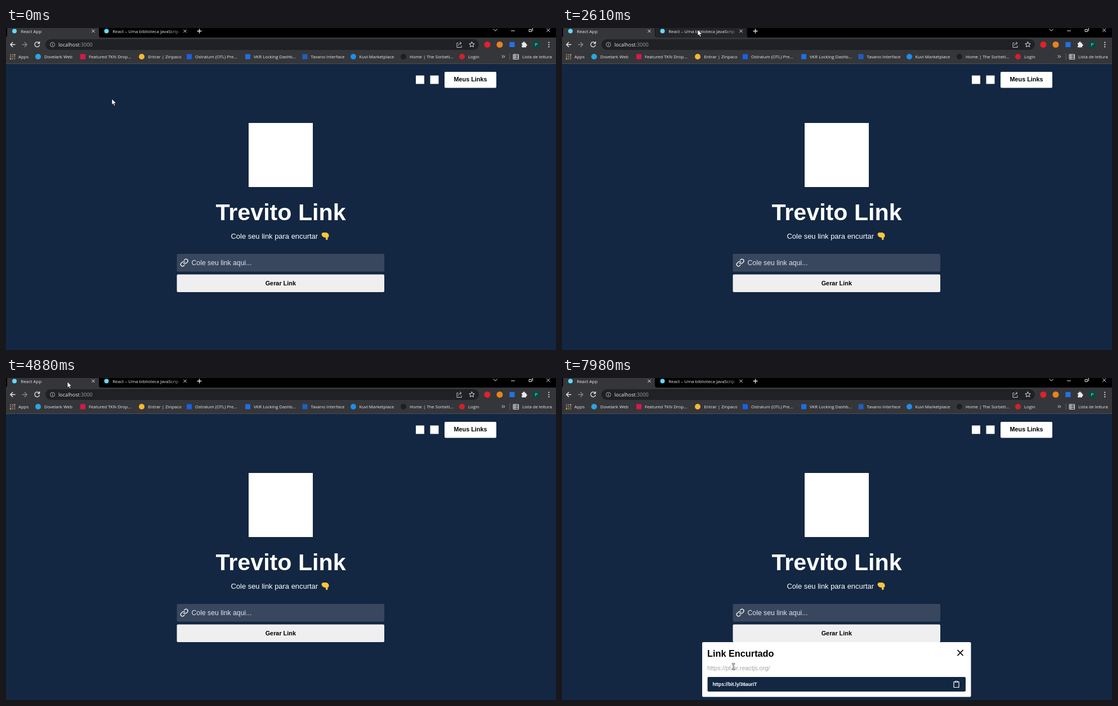
Recreate the animation shown at these times as an HTML page. Size 977 by 573 pixels, loop 8000 ms.

```html
<!DOCTYPE html>
<html lang="pt-BR">
<head>
<meta charset="utf-8">
<title>Trevito Link</title>
<style>
html, body { margin: 0; width: 100%; height: 100%; overflow: hidden; background: #132742; }
svg { display: block; }
text { white-space: pre; }
.ui { font-family: "Open Sans", "Noto Sans", sans-serif; }
.app { font-family: "Liberation Sans", Arial, sans-serif; }
.line { fill: none; stroke-linecap: round; stroke-linejoin: round; }
</style>
</head>
<body>
<svg id="stage" width="977" height="573" viewBox="0 0 977 573"></svg>
<script>
const text = (x, y, size, str, fill = '#fff', extra = '') =>
  `<text x="${x}" y="${y}" font-size="${size}" fill="${fill}" ${extra}>${str}</text>`;
const rect = (x, y, w, h, fill, r = 0, extra = '') =>
  `<rect x="${x}" y="${y}" width="${w}" height="${h}" rx="${r}" fill="${fill}" ${extra}/>`;
const dot = (x, y, r, fill, extra = '') => `<circle cx="${x}" cy="${y}" r="${r}" fill="${fill}" ${extra}/>`;
const line = (d, stroke = '#e8eaed', width = 1, extra = '') =>
  `<path class="line" d="${d}" stroke="${stroke}" stroke-width="${width}" ${extra}/>`;
const group = (id, body, extra = '') => `<g id="${id}" ${extra}>${body}</g>`;
const lines = (x, y, step, size, rows, fill, extra) =>
  rows.map((row, i) => text(x, y + i * step, size, row, fill, extra)).join('');
const cross = (x, y, r, color, width) =>
  line(`M${x - r} ${y - r}l${2 * r} ${2 * r}m0 ${-2 * r}l${-2 * r} ${2 * r}`, color, width);

const NAVY = '#132742', CYAN = '#61dafb', BAR = '#35363a', LIGHT = '#e8eaed';
const BOLD = 'font-weight="700"', THIN = 'font-weight="300"', MID = 'text-anchor="middle"';

// Browser window
const bookmarks = [
  [22, 'Apps'], [68, 'Dovelark Web', 57, '#2ca5e0'], [147, 'Featured TKN Drop...', 136.5, '#dd1745', 1],
  [252.5, 'Entrar | Zinpaco', 241, '#f3ba2f'], [336, 'Ostralum (OTL) Pre...', 325.5, '#1d5fe6', 1],
  [440, 'VKR Locking Dashb...', 429.5, '#1f6fe0', 1], [541.5, 'Tavano Interface', 531, '#1f5fc0', 1],
  [627.5, 'Kuvi Marketplace', 617, '#1d8cf0'], [717, 'Home | The Sorbeti...', 706, '#1d1e20'],
  [821, 'Login', 810, '#d3202e'],
];
const bookmarkBar = bookmarks.map(([x, label, icon, color, square]) =>
  text(x, 53.8, 7.75, label, LIGHT) + (!icon ? '' :
    square ? rect(icon - 4.5, 46.5, 9, 9, color) : dot(icon, 51, 5, color))).join('');
const appGrid = [...'012345678'].map(i =>
  rect(7 + i % 3 * 3.6, 46.6 + (i / 3 | 0) * 3.6, 2.2, 2.2, ['#e8564a', '#4a8af4', '#f4bd2e', '#3aa757'][i % 4])).join('');
const tabShape = (id, fill) => `<path id="${id}" fill="${fill}" d="M-3 17.5q5 0 5-5V0H165V12.5q0 5 5 5z"/>`;

const windowFrame =
  rect(0, 0, 977, 18, '#000') + tabShape('hoverTab', '#242528') +
  rect(0, 17, 977, 47, BAR) + rect(0, 63, 977, 1, '#4b4d51') + tabShape('tab', BAR) +
  dot(15, 5.5, 4, CYAN) + text(26.3, 8.6, 7.9, 'React App', LIGHT) + cross(155, 5.5, 2.4, LIGHT) +
  dot(178.5, 5.5, 4, CYAN) + text(189.3, 8.6, 7.8, 'React – Uma biblioteca JavaScrip', 'url(#fade)') +
  cross(318, 5.5, 2.4, LIGHT) + line('M340 5.5h7m-3.5-3.5v7', LIGHT, 1.3) +
  line('M866 2l3.3 3.3L872.3 2M897.5 5h6M929.5 2.5h4v4h-4zM931-.5h4.5V5') + cross(963.3, 4, 2.8, LIGHT) +
  line('M16 29.5H8m3.8-4l-4 4 4 4', LIGHT, 1.3) + line('M29 29.5h8m-3.8-4l4 4-4 4', '#85878b', 1.3) +
  line('M59 27a4.3 4.3 0 1 0 .4 3.6M59.6 24.5v3h-3', LIGHT, 1.3) +
  rect(70, 20, 770, 19, '#202124', 9.5, 'id="pill"') +
  group('localUrl', dot(82.5, 29.5, 4, 'none', 'stroke="#aab0b6"') + line('M82.5 29v2.5m0-4v.1', '#aab0b6') +
    text(93, 32.7, 9, 'localhost<tspan fill="#9aa0a6">:3000</tspan>', LIGHT)) +
  group('reactUrl', rect(79.5, 28, 6, 5, '#aab0b6', .5) + line('M80.8 28v-1.6a1.7 1.7 0 0 1 3.4 0v1.6', '#aab0b6') +
    rect(93, 23, 68, 13, '#62789b', 0, 'id="selection"') + text(93.3, 32.7, 8.9, 'pt-br.reactjs.org', LIGHT)) +
  line('M803 26.5h-2v8h8v-3M803.5 31q.5-4 5-4m-2-2.2l2.5 2.2-2.5 2.2', '#c4c7cb') +
  line('M827.5 24.7l1.4 3 3.3.4-2.4 2.2.6 3.3-2.9-1.6-2.9 1.6.6-3.3-2.4-2.2 3.3-.4z', LIGHT) +
  dot(855, 29.5, 5.5, '#e3202b') + dot(877, 29.5, 5.5, '#e8821e') + rect(894.5, 25, 9, 9, '#1f74e8') +
  rect(916, 26.5, 8, 8, LIGHT, 1) + dot(920, 26, 1.7, LIGHT) + dot(924, 30.5, 1.7, LIGHT) + dot(916, 30.5, 1.3, BAR) +
  dot(942, 29.5, 7, '#064b40') + text(942, 32.3, 8, 'P', '#dfe7e5', MID) +
  [25.6, 29.5, 33.4].map(y => dot(964.3, y, 1.1, LIGHT)).join('') +
  appGrid + bookmarkBar + line('M881 48.8l2 2-2 2m3-4l2 2-2 2') + rect(894.5, 45, 1, 12, '#5f6165') +
  line('M901.5 47h9v8.5h-9zM901.5 49.8h9m-9 2.8h9M904 47v8.5') + text(917, 53.8, 7.75, 'Lista de leitura', LIGHT);

// Link shortener page
const chain = 'M10 13a5 5 0 0 0 7.54.54l3-3a5 5 0 0 0-7.07-7.07l-1.72 1.71M14 11a5 5 0 0 0-7.54-.54l-3 3a5 5 0 0 0 7.07 7.07l1.71-1.71';
const home = rect(0, 64, 977, 509, NAVY) +
  group('header', rect(728, 84.5, 15, 15, '#fff') + rect(753.5, 84.5, 15, 15, '#fff') +
    rect(779, 78, 92, 28.5, '#fff', 2) + text(825, 95.4, 10.85, 'Meus Links', '#000', `${BOLD} ${MID}`)) +
  group('content',
    rect(431, 169, 114, 114, '#fff') +
    text(488, 342, 41.2, 'Trevito Link', '#fff', `${BOLD} ${MID}`) +
    text(399.5, 375, 12.95, 'Cole seu link para encurtar') +
    '<path fill="#fbc63c" d="M563 364h6q4 1 4.500 4.500V371q-.5 1.500-2 1.500V376q-1.500 2.500-3.500 0v-3q-5 0-7-4-1.500-3 2-5z"/>' +
    group('form',
      rect(303.5, 402, 368.5, 31.5, '#38475e', 2) + line(chain, '#fff', 2, 'transform="translate(309 410) scale(.636)"') +
      group('placeholder', text(329.5, 421.7, 12.25, 'Cole seu link aqui...', '#dfe3e9')) +
      group('pasted', text(329.5, 421.7, 12.25, 'https://pt-br.reactjs.org/')) +
      group('button', rect(303.5, 438.5, 368.5, 31.5, '#efefef', 2) +
        text(487.8, 458, 10.85, 'Gerar Link', '#000', `${BOLD} ${MID}`))) +
    group('modal', rect(249, 470, 477.5, 97.5, '#fff', 2) + text(258, 496, 16.3, 'Link Encurtado', '#000', BOLD) +
      cross(707.5, 489, 4.6, '#000', 1.6) + text(258, 519.7, 10.9, 'https://pt-br.reactjs.org/', '#a4a4a4') +
      rect(258.5, 532, 458.5, 26, NAVY, 2) + text(267.5, 548, 8.3, 'https://bit.ly/36auriT', '#fff', BOLD) +
      line('M698.5 540.5h-2.5v10h9v-10h-2.5M698.5 539.5h4v2h-4z', '#fff', 1.2)));

// Documentation page
const column = (x, title, y, rows) => lines(x, 481, 21, 15, title, '#6d6d6d', THIN) + lines(x, y, 19.5, 11, rows, '#1a1a1a');
const docs = rect(0, 64, 967, 329, '#282c34') + dot(725, 385, 214, '#30333c') +
  rect(0, 64, 967, 41, '#20232a') + rect(0, 393, 967, 180, '#fff') +
  dot(73.5, 85, 6.5, CYAN) + text(88, 89.7, 12.7, 'React', CYAN, BOLD) +
  [[225, 'Documentação'], [331, 'Tutorial'], [394.5, 'Blog'], [445, 'Comunidade']]
    .map(([x, label]) => text(x, 89.3, 11.3, label, '#fff', THIN)).join('') +
  dot(553.5, 83.5, 3.5, 'none', 'stroke="#fff" stroke-width="1.4"') + line('M556.2 86.2l3.3 3.5', '#fff', 1.6) +
  text(566, 89.3, 11.3, 'Buscar docs', '#7b7e84', THIN) + text(717, 88.2, 9, 'v17.0.2') +
  text(760.5, 86.5, 9, '文', '#fff', 'font-family="Noto Sans CJK SC, sans-serif"') + text(768, 91, 10.5, 'A') +
  text(781.7, 88.2, 9.1, 'Languages') + text(847.7, 88.2, 9, 'Codrux') +
  line('M886 82h-2.5v5.5h5.5V85M887 81.5h2.7v2.7m-.2-2.5l-3 3', '#70747a', .8) +
  text(482.5, 210, 37.8, 'React', CYAN, `${BOLD} ${MID}`) +
  text(482, 250, 19.4, 'Uma biblioteca JavaScript para criar interfaces de usuário', '#fff', `${THIN} ${MID}`) +
  rect(363, 299, 124, 36, CYAN) + text(425, 322.3, 12.8, 'Comece a Usar', '#000', MID) +
  text(502, 322.3, 12.8, 'Faça o Tutorial', CYAN) + line('M597.5 314.5l3.5 3.5-3.5 3.5', CYAN, .9) +
  column(66, ['Declarativo'], 513.3, ['React faz com que a criação de UIs interativas seja', 'uma tarefa fácil. Crie views simples para cada',
    'estado na sua aplicação, e o React irá atualizar e', 'renderizar de forma eficiente apenas os']) +
  column(352, ['Baseado em componentes'], 513.3, ['Crie componentes encapsulados que gerenciam',
    'seu próprio estado e então, combine-os para criar', 'UIs complexas.']) +
  column(639, ['Aprenda uma vez, use em qualquer', 'lugar'], 534.5, ['Não fazemos suposições sobre as outras',
    'tecnologias da sua stack, assim você pode', 'desenvolver novos recursos com React sem']);

const scrollbar = rect(967, 64, 10, 509, '#f1f1f1') + rect(968, 75, 8, 98, '#c1c1c1', 0, 'id="thumb"') +
  '<path fill="#666" d="M969.5 71l2.5-3 2.5 3zM969.5 567l2.5 3 2.5-3z"/>';

const stage = document.getElementById('stage');
stage.innerHTML = `<defs><linearGradient id="fade" gradientUnits="userSpaceOnUse" x1="290" x2="309">
  <stop stop-color="${LIGHT}"/><stop offset="1" stop-color="#6a6b6d"/></linearGradient></defs>` +
  group('home', home, 'class="app"') + group('docs', docs, 'class="ui"') + group('scrollbar', scrollbar) +
  group('frame', windowFrame, 'class="ui"') +
  '<path id="arrow" fill="#fff" stroke="#111" stroke-width=".8" d="M0 0V11l2.5-2.4 1.7 4 1.9-.8-1.7-3.9H7.8z"/>' +
  group('beam', line('M-2 -5h4M-2 5h4M0 -5V5', '#111', 1.8) + line('M-2 -5h4M-2 5h4M0 -5V5', '#e4e4e4', .9));

const el = Object.fromEntries([...stage.querySelectorAll('[id]')].map(node => [node.id, node]));
const show = (node, on) => { node.style.display = on ? '' : 'none'; };
const move = (node, x, y, more = '') => node.setAttribute('transform', `translate(${x} ${y})${more}`);

// Eased value between [time, ...values] keys
function track(keys, t) {
  const next = keys.findIndex(key => key[0] > t);
  if (next < 1) return (next ? keys.at(-1) : keys[0]).slice(1);
  const [a, b] = [keys[next - 1], keys[next]];
  const p = (t - a[0]) / (b[0] - a[0]), e = p * p * (3 - 2 * p);
  return a.slice(1).map((v, i) => v + (b[i + 1] - v) * e);
}

const pointer = [[270, 188, 126], [1010, 505, 400], [1510, 516, 389.5], [1860, 512, 375], [2540, 241, 3], [2900, 241, 3],
  [3250, 230, 24], [3500, 226, 24], [3640, 252, 22], [3840, 252, 22], [4390, 109, 6.5], [4940, 109, 6.5], [5080, 614, 383],
  [5300, 602, 416], [6060, 590, 422], [6400, 560, 456], [6900, 545, 476], [7270, 538, 497], [7340, 538, 497], [7800, 304.5, 513.5]];
const formDrop = [[650, 0], [1080, 18], [1510, 9], [1930, 4], [2050, 0]];
const buttonScale = [[6200, 1], [6600, 1.05], [6900, 1.05], [7270, 1.004], [7400, 1]];
const TAB_STEP = 163.5;

function render(now) {
  const t = now % 8000;
  const onDocs = t >= 2740 && t < 4600, focused = onDocs && t >= 3300;
  const pasted = t >= 5500 && t < 6990, modalOpen = t >= 7060;
  const rise = 64 * (1 - Math.min(1, (t - 7060) / 880)) ** 2;
  const overflow = modalOpen ? rise - 6 : 0;
  const scrolls = overflow > 0;
  const [x, y] = track(pointer, t);

  show(el.docs, onDocs);
  show(el.home, !onDocs);
  show(el.reactUrl, onDocs);
  show(el.localUrl, !onDocs);
  show(el.selection, focused);
  move(el.tab, onDocs ? TAB_STEP : 0, 0);
  move(el.hoverTab, onDocs ? 0 : TAB_STEP, 0);
  show(el.hoverTab, y < 17 && x < 328 && x > 165 !== onDocs);
  el.pill.setAttribute('fill', !focused && y > 20 && y < 39 ? '#2f3033' : '#202124');
  el.pill.setAttribute('stroke', focused ? '#7ba4e6' : 'none');

  show(el.scrollbar, onDocs || scrolls);
  el.thumb.setAttribute('height', onDocs ? 98 : 488 * 509 / (509 + Math.max(0, overflow)));
  move(el.header, scrolls ? -10 : 0, 0);
  move(el.content, scrolls ? -5.5 : 0, 0);
  move(el.form, 0, track(formDrop, t)[0]);
  move(el.button, 487.75, 454.25, ` scale(${track(buttonScale, t)[0]}) translate(-487.75 -454.25)`);
  show(el.placeholder, !pasted);
  show(el.pasted, pasted);
  show(el.modal, modalOpen);
  move(el.modal, 0, rise);

  const beam = onDocs && y > 19 || t > 5200 && t < 6150 || t > 7700;
  show(el.beam, beam);
  show(el.arrow, !beam);
  move(beam ? el.beam : el.arrow, x, y);
  requestAnimationFrame(render);
}
requestAnimationFrame(render);
</script>
</body>
</html>
```
